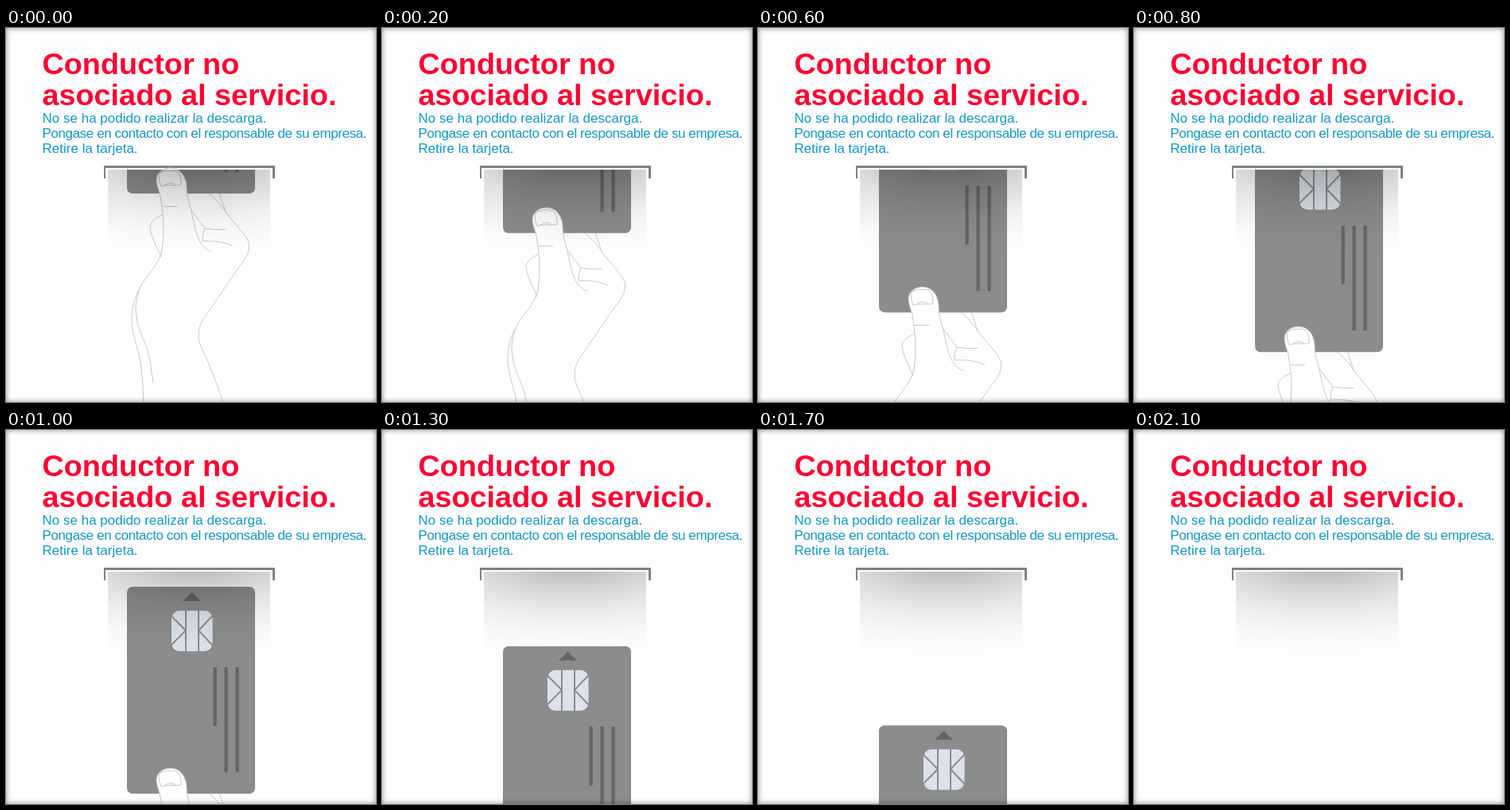
An HTML page with a canvas that plays this animation: 465 by 470 pixels, repeating every 2.2 s.

```html
<!DOCTYPE html>
<html lang="es">
<head>
<meta charset="utf-8">
<title>Retire la tarjeta</title>
<style>
html, body { margin: 0; width: 100%; height: 100%; overflow: hidden; background: #fff; }
#stage { position: relative; width: 465px; height: 470px; background: #fefefe; overflow: hidden; }
canvas, svg, .edge { position: absolute; left: 0; top: 0; width: 465px; height: 470px; }
.edge { box-shadow: inset 0 0 7px rgba(0, 0, 0, .46); }
text { font-family: "Liberation Sans", Arial, sans-serif; }
.title { font-size: 37.85px; font-weight: bold; fill: #ff0033; }
.info { font-size: 17px; fill: #1496c3; }
</style>
</head>
<body>
<div id="stage">
  <canvas id="view" width="465" height="470"></canvas>
  <svg viewBox="0 0 465 470">
    <text class="title" x="45.4" y="58">Conductor no</text>
    <text class="title" x="45.4" y="97">asociado al servicio.</text>
    <text class="info" x="45.6" y="119">No se ha podido realizar la descarga.</text>
    <text class="info" x="45.6" y="138" letter-spacing="-0.41">Pongase en contacto con el responsable de su empresa.</text>
    <text class="info" x="45.6" y="157">Retire la tarjeta.</text>
  </svg>
  <div class="edge"></div>
</div>
<script>
const W = 465, H = 470, LOOP = 2200, TICK = 100, STEP = 24.9;
const SLOT = { x: 128, y: 178, w: 204, h: 122 };
const ctx = document.getElementById('view').getContext('2d');

const leftSide = `M173 472 C172 450 171 428 167 410 C163 396 158 380 158 365
  C158 350 162 338 167 329 C175 312 188 302 194 286
  C187 270 181 258 181 249 C183 242 189 238 196 235`;
const rightSide = `L276 231 C285 244 297 254 304 267 C308 276 304 288 293 300 L250 363
  C240 376 240 390 247 405 C256 424 264 442 273 472`;
const thumbEdge = `M194 288 C199 268 199 242 195 218 C194 207 189 199 189 190
  C190 181 198 176 207 176 C218 176 226 185 227 199 C227 211 230 220 233 230
  C236 245 238 256 243 267 C247 275 252 279 258 281`;

const palm = new Path2D(`${leftSide} L254 207 L268 208 ${rightSide} Z`);
const thumb = new Path2D(`${thumbEdge} L240 300 Z`);
const thumbLine = new Path2D(thumbEdge);
const fingers = new Path2D(`${leftSide} M268 207 ${rightSide}
  M254 207 C263 214 271 223 276 231
  M168 329 C163 340 162 352 164 364 C167 384 177 395 181 418 L185 446
  M233 229 L250 252 Q263 254 276 253 M250 252 Q246 260 247 267
  M247 268 C261 267 275 269 285 274`);
const nail = new Path2D(`M195 199 C193 194 191 188 193 183 C197 178 212 178 216 181
  C220 186 220 191 220 197 C211 199 203 196 195 199 Z
  M199 198 C204 194 209 194 213 197`);
const crease = new Path2D('M196 224 Q206 225 215 224');

function box(x, y, w, h, r, color) {
  ctx.fillStyle = color;
  ctx.beginPath();
  ctx.roundRect(x, y, w, h, r);
  ctx.fill();
}

function line(color, width, ...pts) {
  ctx.strokeStyle = color;
  ctx.lineWidth = width;
  ctx.beginPath();
  pts.forEach(([x, y], i) => i ? ctx.lineTo(x, y) : ctx.moveTo(x, y));
  ctx.stroke();
}

function drawCard(top) {
  const body = '#8c8c8e', mark = '#656567';
  ctx.save();
  ctx.beginPath();
  ctx.rect(0, SLOT.y, W, H);
  ctx.clip();
  ctx.translate(0, top);
  box(152, 0, 161, 260, 7, body);
  ctx.fillStyle = mark;
  ctx.beginPath();
  ctx.moveTo(233.5, 7);
  ctx.lineTo(245, 18);
  ctx.lineTo(222, 18);
  ctx.fill();
  box(208, 30, 51.5, 51, 10, '#dde3e5');
  for (const x of [226, 242]) line(body, 2, [x, 29], [x, 82]);
  line(body, 2, [207, 36], [226, 55], [207, 74]);
  line(body, 2, [260, 36], [242, 55], [260, 74]);
  [74, 132, 132].forEach((h, i) => box(260.5 + 14 * i, 101, 4.2, h, 0, mark));
  ctx.restore();
}

function drawHand(dy, front) {
  ctx.save();
  ctx.translate(0, dy);
  ctx.fillStyle = '#fefefe';
  ctx.strokeStyle = '#c6c6c6';
  ctx.lineWidth = 1;
  ctx.fill(front ? thumb : palm);
  for (const p of front ? [thumbLine, nail, crease] : [fingers]) ctx.stroke(p);
  ctx.restore();
}

// Shade under the slot, lighter toward both sides
function drawShade() {
  const { x, y, w, h } = SLOT;
  ctx.save();
  ctx.beginPath();
  ctx.rect(x, y, w, h);
  ctx.clip();
  ctx.translate(x + w / 2 + 8, y);
  ctx.scale(2.6, 1);
  const g = ctx.createRadialGradient(0, -20, 0, 0, -20, 140);
  for (let i = 0; i <= 20; i++) {
    const d = Math.max(0, i * 7 - 20) / 120;
    g.addColorStop(i / 20, `rgba(0,0,0,${0.25 * (1 - d) ** 2.1})`);
  }
  ctx.fillStyle = g;
  ctx.fillRect(-w, 0, 2 * w, h);
  ctx.restore();
}

function drawSlot() {
  ctx.fillStyle = '#808080';
  ctx.fillRect(123, 173, 215, 3);
  ctx.fillRect(123, 173, 2, 16);
  ctx.fillRect(335, 173, 3, 16);
}

function draw(ms) {
  const dy = Math.floor(ms % LOOP / TICK) * STEP;
  ctx.clearRect(0, 0, W, H);
  drawSlot();
  drawHand(dy, false);
  drawCard(dy - 52);
  drawHand(dy, true);
  drawShade();
}

const start = performance.now();
function tick() {
  draw(performance.now() - start);
  requestAnimationFrame(tick);
}
tick();
</script>
</body>
</html>
```
